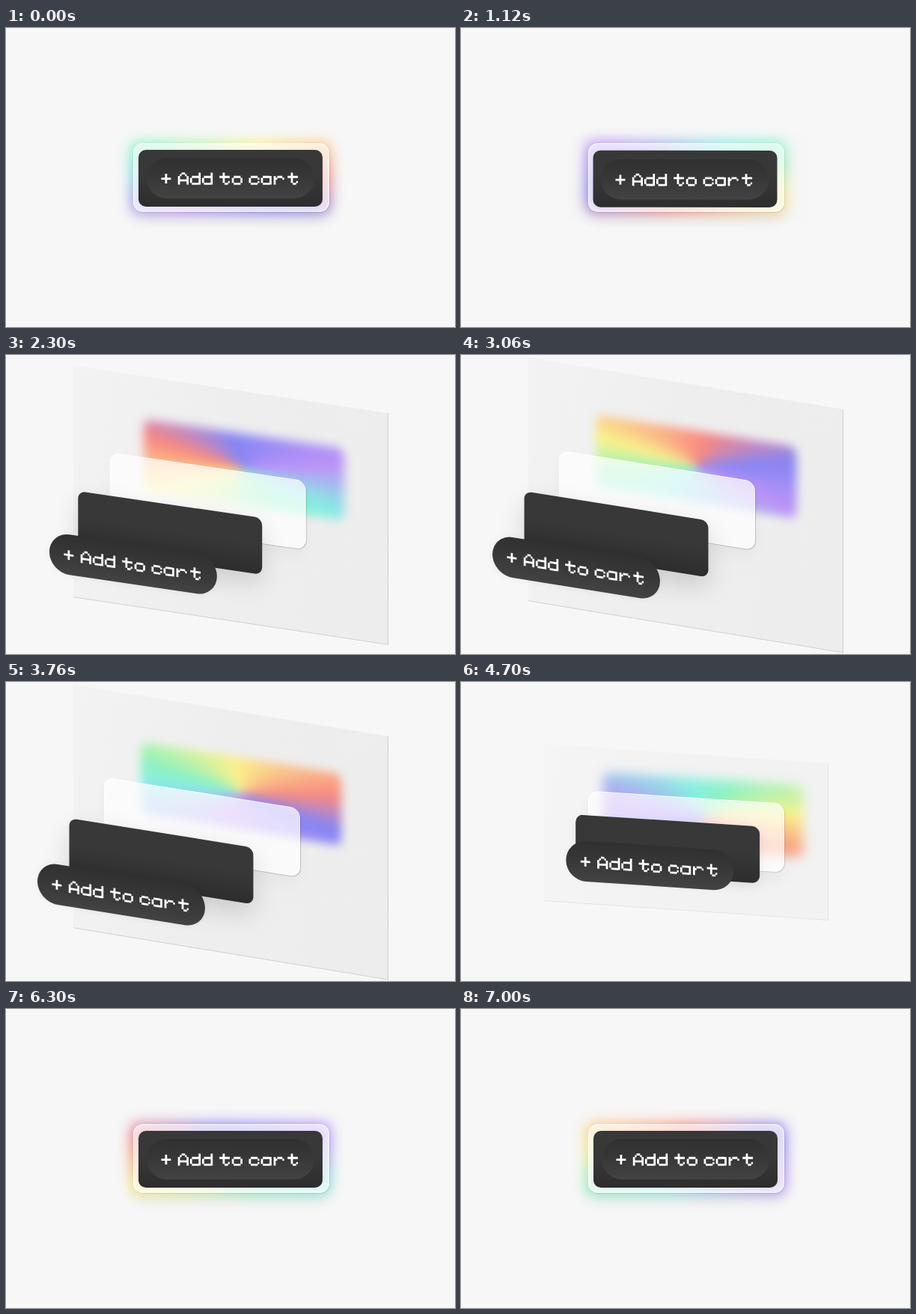
Recreate the animation shown at these times as an HTML page. Size 600x400 px, loop 7.03 s.

```html
<!DOCTYPE html>
<html lang="en">
<head>
<meta charset="utf-8">
<title>Add to cart</title>
<style>
  html, body { margin: 0; width: 100%; height: 100%; overflow: hidden; background: #f7f7f7; }
  #stage { position: relative; width: 600px; height: 400px; overflow: hidden; }
  #stage > * { position: absolute; box-sizing: border-box; }
  #panel {
    background: linear-gradient(100deg, #f3f3f4, #eeeeee 45%, #ededed);
    border: solid #cfcfcf; border-width: 0 1px 1px 0;
  }
  #glow { left: 166px; top: 152px; width: 268px; height: 96px; }
  #clip { width: 100%; height: 100%; overflow: hidden; border-radius: 10px; }
  /* a square sweep flattened to the height of the glow */
  #sweep { width: 268px; height: 268px; transform: scaleY(.3582); transform-origin: top; }
  #card {
    left: 169.5px; top: 154px; width: 262px; height: 92px; border-radius: 13px;
    border: 1px solid rgba(255, 255, 255, .75);
  }
  #base {
    left: 177px; top: 163px; width: 246px; height: 76px; border-radius: 10px;
    background: linear-gradient(#383838, #383838 45%, #2d2d2d);
  }
  #pill {
    left: 188px; top: 173.5px; width: 224px; height: 54px; border-radius: 27px;
    background: linear-gradient(#303030, #373737 45%, #434343);
  }
  #pill svg { display: block; fill: none; stroke: #fff; stroke-width: 1.2; }
</style>
</head>
<body>
<div id="stage">
  <div id="panel"></div>
  <div id="glow"><div id="clip"><div id="sweep"></div></div></div>
  <div id="card"></div>
  <div id="base"></div>
  <div id="pill">
    <svg width="224" height="54" role="img" aria-label="+ Add to cart">
      <g id="label" transform="translate(42 19.5) scale(2.3)"></g>
    </svg>
  </div>
</div>
<script>
const LOOP = 7030;
const $ = id => document.getElementById(id);
const [panel, glow, card, base, pill] = ['panel', 'glow', 'card', 'base', 'pill'].map($);
const sweep = $('sweep');

// Pixel lettering: strokes about one unit wide on a unit grid
const bowl = 'M1 2.5h4M1 6.5h4M.5 3v3';
const glyphs = {
  '+': 'M-.3 3.5h5.6M2.5 .7v5.6',
  A: 'M2 .5h2M1 1.5h1M4 1.5h1M.5 2v5M5.5 2v5M1 4.5h4',
  d: bowl + 'M5.5 0v7',
  t: 'M2.5 0v6M0 2.5h6M3 6.5h2M5 5.5h1',
  o: bowl + 'M5.5 3v3',
  c: bowl + 'M5 3.5h1M5 5.5h1',
  a: bowl + 'M5.5 2v5',
  r: 'M.5 2v5M1 3.5h1M2 2.5h3M5 3.5h1'
};
const letters = [...'+Addtocart'];
const places = [-9.5, 0, 7, 14, 24, 31.3, 41.2, 48.2, 55.6, 63.6];
$('label').innerHTML = letters
  .map((c, i) => `<path d="${glyphs[c]}" transform="translate(${places[i]})"/>`).join('');

const hues = '#fcf283 0deg, #fbb580 38deg, #f98078 74deg, #c080b8 100deg, #7d7df6 128deg,' +
  '#b98cf8 198deg, #7eeee2 270deg, #86f2bd 300deg, #fcf283 360deg';

const clamp = v => Math.min(1, Math.max(0, v));

// cubic-bezier(.4, 0, .2, 1), solved by bisection
function ease(u) {
  let lo = 0, hi = 1, s = u;
  for (let i = 0; i < 24; i++) {
    s = (lo + hi) / 2;
    const x = 1.2 * s * (1 - s) ** 2 + .6 * s * s * (1 - s) + s ** 3;
    if (x < u) lo = s; else hi = s;
  }
  return 3 * s * s * (1 - s) + s ** 3;
}

const spread = t => ease(clamp((t - 1000) / 1940)) - ease(clamp((t - 3993) / 1900));

function draw(t) {
  const p = clamp(spread(t));
  const tilt = p ** 1.1;
  const drift = Math.max(0, p - .61);

  const place = (el, depth) => {
    const x = -100 * drift - 53.5 * p * depth;
    const y = -15 * drift + 44.7 * p ** .86 * depth;
    el.style.transform = `matrix(1, ${.16 * tilt}, 0, 1, ${x}, ${y})`;
  };
  [glow, card, base, pill].forEach((el, i) => place(el, i - 1));

  const w = 421 - 135 * Math.max(0, .75 - p);
  const h = 326 - 210 * (1 - p);
  Object.assign(panel.style, {
    width: w + 'px', height: h + 'px',
    left: 300.5 - w / 2 + 'px', top: 201 - h / 2 + 'px',
    opacity: clamp(p * 1.1),
    transform: `matrix(1, ${.165 * tilt}, 0, 1, 0, 0)`
  });

  sweep.style.background = `conic-gradient(from ${17 + t * .09}deg, ${hues})`;
  glow.style.filter = `blur(${9 - 2.5 * p}px)`;
  glow.style.opacity = .92;

  card.style.background = `rgba(255, 255, 255, ${.64 + .08 * p})`;
  card.style.boxShadow = `1px 1px 1px rgba(60, 40, 40, ${.1 + .14 * p}), ` +
    `0 12px 20px rgba(0, 0, 0, ${.06 - .03 * p})`;
  base.style.boxShadow = `0 ${14 * p}px ${34 * p}px rgba(0, 0, 0, ${.15 * p})`;
  pill.style.boxShadow = `0 0 ${12 * p}px rgba(0, 0, 0, ${.05 * p})`;
}

const start = performance.now();
function tick() {
  draw((performance.now() - start) % LOOP);
  requestAnimationFrame(tick);
}
draw(0);
requestAnimationFrame(tick);
</script>
</body>
</html>
```
